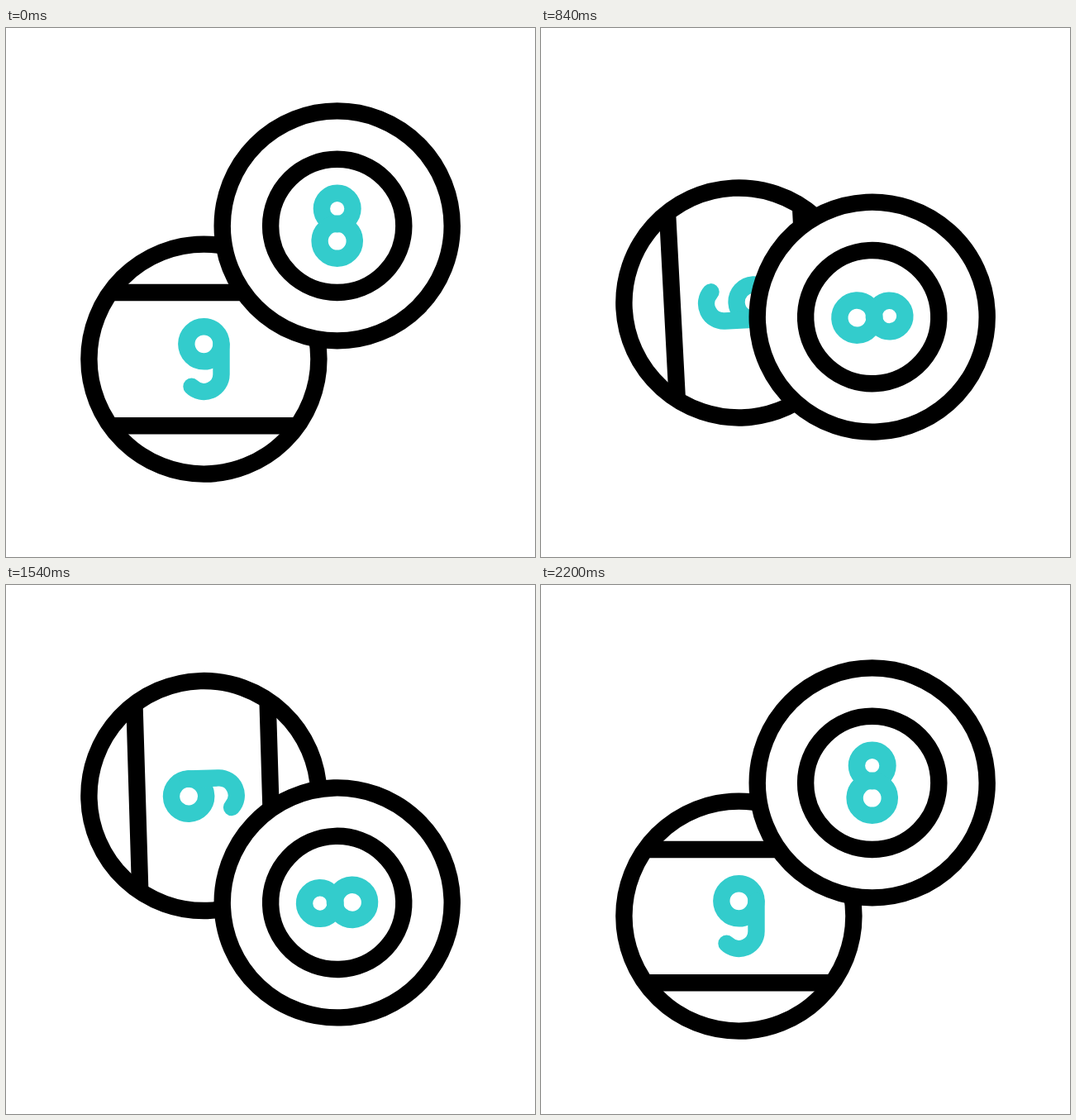
An HTML page that plays this animation: 640x640 px, repeating every 2.4 s.

```html
<!DOCTYPE html>
<html lang="en">
<head>
<meta charset="utf-8">
<title>Pool balls</title>
<style>
  html, body { margin: 0; height: 100%; overflow: hidden; background: #fff; }
  svg { display: block; width: 100%; height: 100%; }
  g { fill: none; stroke: #000; stroke-width: 20.4; }
  .teal { stroke: #3cc; stroke-linecap: round; stroke-linejoin: round; }
  .body { fill: #fff; }
</style>
</head>
<body>
<svg viewBox="0 0 640 640">
  <g id="trails"></g>
  <g id="nine">
    <circle class="body" r="139"/>
    <path d="M-113-80.6H113M-113 80.6H113"/>
    <g class="teal">
      <circle cy="-18.3" r="21.1"/>
      <path d="M21.1-18.3V18.3A21.1 21.1 0 0 1-14.9 33.2"/>
    </g>
  </g>
  <g id="eight">
    <circle class="body" r="139"/>
    <circle r="80.6"/>
    <g class="teal">
      <circle cy="-20.9" r="18.8"/>
      <circle cy="18.3" r="21.1"/>
    </g>
  </g>
</svg>
<script>
const LOOP = 2400;
const $ = id => document.getElementById(id);

// Eased progress from 0 to 1 between two times
const ease = (t, from, to) => {
  const p = Math.min(1, Math.max(0, (t - from) / (to - from)));
  return p * p * (3 - 2 * p);
};

// Rest, far point, middle point, far point again, rest
const travel = (t, rest, far, mid) =>
  rest + (far - rest) * (ease(t, 200, 600) - ease(t, 1800, 2200))
       + (mid - far) * (ease(t, 600, 1000) - ease(t, 1000, 1800));

// Each trail grows downwards for 200 ms, then its top end follows
const trails = [
  { x: 62, y: 349.7, length: 63.6, start: 400 },
  { x: 113.3, y: 401, length: 89.6, start: 400 },
  { x: 494.7, y: 91.2, length: 63.6, start: 1600 },
  { x: 545.9, y: 142.4, length: 89.6, start: 1600 }
];
for (const trail of trails) {
  trail.path = document.createElementNS('http://www.w3.org/2000/svg', 'path');
  trail.path.setAttribute('class', 'teal');
  $('trails').append(trail.path);
}

function place(id, x, y, angle) {
  $(id).setAttribute('transform', `translate(${x} ${y}) rotate(${angle})`);
}

function draw(now) {
  const t = now % LOOP;
  const angle = 360 * ease(t, 200, 2200);
  place('nine', 239.4, travel(t, 400.6, 207, 400.6), angle);
  place('eight', 400.7, travel(t, 239.4, 406, 319), angle);
  for (const { x, y, length, start, path } of trails) {
    const head = ease(t, start, start + 200);
    const tail = ease(t, start + 200, start + 400);
    path.setAttribute('d', head > tail
      ? `M${x} ${y + length * tail}V${y + length * head}` : '');
  }
}

let begin;
function tick(now) {
  begin ??= now;
  draw(now - begin);
  requestAnimationFrame(tick);
}
draw(0);
requestAnimationFrame(tick);
</script>
</body>
</html>
```
